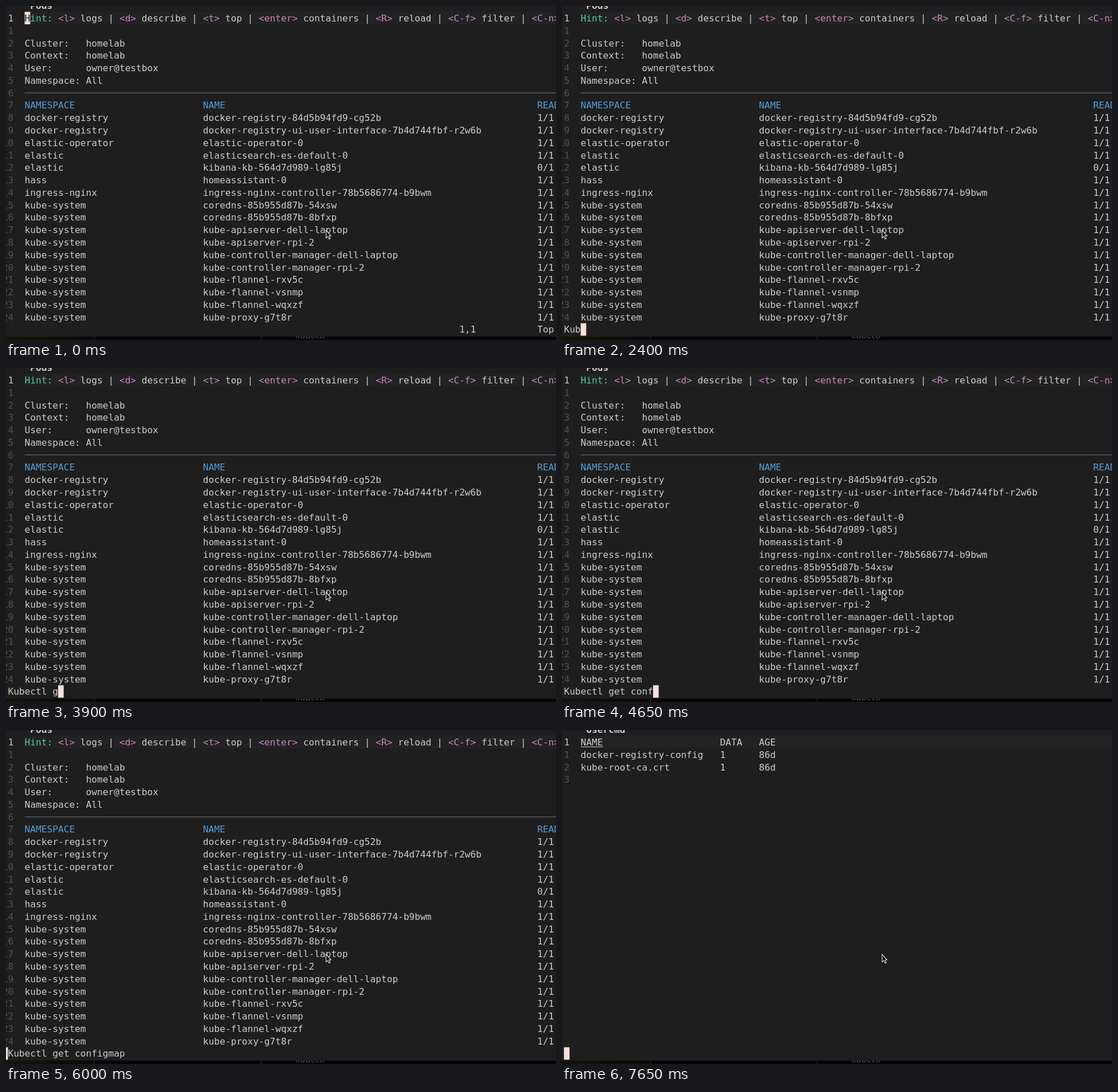
These frames come from a looping animation (960 px wide and 584 px high, 8 s). An HTML page with a canvas:

```html
<!DOCTYPE html>
<html lang="en">
<head>
<meta charset="utf-8">
<title>Cluster terminal</title>
<style>
  html, body { margin: 0; width: 100%; height: 100%; overflow: hidden; background: #1e1e1e; }
  canvas { display: block; }
</style>
</head>
<body>
<canvas id="stage" width="960" height="584"></canvas>
<script>
const ctx = document.getElementById('stage').getContext('2d');
const W = 960, H = 584, LOOP = 8000;
const LEFT = 3.4, TOP = 10.2, CELL_W = 9.725, ROW_H = 21.78;
const FONT = '16.2px "DejaVu Sans Mono", monospace';
const CMD_ROW = 25, TEXT_COL = 3;
const COLOR = {
  back: '#1e1e1e', line: '#222222', text: '#cccccc', dim: '#505050',
  teal: '#4ec9b0', pink: '#c586c0', blue: '#569cd6', cursor: '#f5e0dc'
};

const hints = [
  ['<l>', 'logs'], ['<d>', 'describe'], ['<t>', 'top'], ['<enter>', 'containers'],
  ['<R>', 'reload'], ['<C-f>', 'filter'], ['<C-n>', 'namespace']
];
const info = ['Cluster:   homelab', 'Context:   homelab', 'User:      owner@testbox', 'Namespace: All'];
const pods = [
  ['docker-registry', 'docker-registry-84d5b94fd9-cg52b'],
  ['docker-registry', 'docker-registry-ui-user-interface-7b4d744fbf-r2w6b'],
  ['elastic-operator', 'elastic-operator-0'],
  ['elastic', 'elasticsearch-es-default-0'],
  ['elastic', 'kibana-kb-564d7d989-lg85j', '0/1'],
  ['hass', 'homeassistant-0'],
  ['ingress-nginx', 'ingress-nginx-controller-78b5686774-b9bwm'],
  ...['coredns-85b955d87b-54xsw', 'coredns-85b955d87b-8bfxp',
    'kube-apiserver-dell-laptop', 'kube-apiserver-rpi-2',
    'kube-controller-manager-dell-laptop', 'kube-controller-manager-rpi-2',
    'kube-flannel-rxv5c', 'kube-flannel-vsnmp', 'kube-flannel-wqxzf',
    'kube-proxy-g7t8r'].map(name => ['kube-system', name])
];

// Typing: [time, number of characters entered]
const COMMAND = 'Kubectl get configmap';
const OPEN = 450, SENT = 6000, RESULT = 6150, REOPEN = 7650;
const keys = [
  [450, 0], [1200, 1], [1800, 0], [1950, 1], [2100, 2], [2400, 3], [2550, 4],
  [2850, 5], [3000, 7], [3900, 9], [4050, 10], [4200, 11], [4350, 13],
  [4500, 15], [4650, 16], [4800, 18], [4950, 19], [5100, 20], [5400, 21]
];

const colX = col => LEFT + col * CELL_W;
const rowY = row => TOP + row * ROW_H;

function put(str, col, row, color = COLOR.text, bold = false) {
  ctx.font = (bold ? 'bold ' : '') + FONT;
  ctx.fillStyle = color;
  [...str].forEach((ch, i) => {
    if (ch !== ' ') ctx.fillText(ch, colX(col + i), rowY(row) + 16.75);
  });
}

function block(col, row, ch = '') {
  ctx.fillStyle = COLOR.cursor;
  ctx.fillRect(colX(col), rowY(row), CELL_W, ROW_H);
  put(ch, col, row, COLOR.back);
}

function drawFrame(title, lastLine) {
  ctx.fillStyle = COLOR.back;
  ctx.fillRect(0, 0, W, H);
  ctx.fillStyle = COLOR.line;
  ctx.fillRect(colX(TEXT_COL), TOP, W, ROW_H);
  put(title, 4, -1, COLOR.text, true);
  put('1', 0, 0, '#c4c4c4');
  for (let n = 1; n <= lastLine; n++) {
    const label = String(n);
    put(label, 1 - label.length, n, COLOR.dim);
  }
}

function drawPods() {
  drawFrame('Pods', 24);
  put('Hint:', TEXT_COL, 0, COLOR.teal);
  let col = TEXT_COL + 6;
  hints.forEach(([key, label], i) => {
    if (i) {
      put('|', col, 0);
      col += 2;
    }
    put(key, col, 0, COLOR.pink);
    put(label, col + key.length + 1, 0);
    col += key.length + label.length + 2;
  });
  info.forEach((line, i) => put(line, TEXT_COL, 2 + i));
  ctx.fillStyle = '#6c6c6c';
  ctx.fillRect(colX(TEXT_COL), 151.3, W, 1.2);
  ['NAMESPACE', 'NAME', 'READY'].forEach((name, i) => put(name, [3, 35, 95][i], 7, COLOR.blue));
  pods.forEach(([space, name, ready = '1/1'], i) => {
    put(space, 3, 8 + i);
    put(name, 35, 8 + i);
    put(ready, 95, 8 + i);
  });
}

function drawResult() {
  drawFrame('Usercmd', 3);
  [['NAME', 'DATA', 'AGE'], ['docker-registry-config', '1', '86d'], ['kube-root-ca.crt', '1', '86d']]
    .forEach((cells, row) => cells.forEach((cell, i) => put(cell, [3, 28, 35][i], row)));
  ctx.fillStyle = COLOR.text;
  ctx.fillRect(colX(TEXT_COL), 29, 4 * CELL_W, 1);
}

function drawRuler(position) {
  put('1,1', 81, CMD_ROW);
  put(position, 95, CMD_ROW);
}

function drawDesktop() {
  const y = 578;
  ctx.save();
  ctx.beginPath();
  ctx.rect(0, y, W, H - y);
  ctx.clip();
  ctx.fillStyle = '#050505';
  ctx.fillRect(0, y, W, H - y);
  const glow = ctx.createLinearGradient(0, 0, 154, 0);
  glow.addColorStop(0, '#14150a');
  glow.addColorStop(1, '#080807');
  ctx.fillStyle = glow;
  ctx.fillRect(0, y, 154, H - y);
  ctx.fillStyle = '#2a2a2a';
  ctx.fillRect(154, y, 1, H - y);
  ctx.fillRect(445, y, 1, H - y);
  ctx.font = '15px "Noto Sans", sans-serif';
  ctx.fillStyle = '#555555';
  ctx.fillText('kubectl', 505, 581);
  ctx.restore();
}

function drawPointer() {
  ctx.save();
  ctx.translate(558.7, 392.3);
  ctx.beginPath();
  ctx.moveTo(0, 0);
  for (const [x, y] of [[0, 13.3], [3, 10.6], [5, 15.3], [7.2, 14.3], [5.2, 9.8], [8.6, 9.5]]) ctx.lineTo(x, y);
  ctx.closePath();
  ctx.fillStyle = '#111111';
  ctx.fill();
  ctx.strokeStyle = '#e8e8e8';
  ctx.lineWidth = 1.1;
  ctx.stroke();
  ctx.restore();
}

function drawCommand(t) {
  const typed = keys.filter(([at]) => at <= t).pop()[1];
  // The first key is typed in lower case, then corrected.
  put(t < 1800 ? 'k'.repeat(typed) : COMMAND.slice(0, typed), 0, CMD_ROW);
  block(t < SENT ? typed : -1, CMD_ROW);
}

function render(t) {
  if (t < RESULT) drawPods();
  else drawResult();

  if (t < OPEN) {
    block(TEXT_COL, 0, 'H');
    drawRuler('Top');
  } else if (t < RESULT) {
    drawCommand(t);
  } else if (t < REOPEN) {
    block(TEXT_COL, 0, 'N');
    put(COMMAND, 0, CMD_ROW);
    drawRuler('All');
  } else {
    block(0, CMD_ROW);
  }
  drawDesktop();
  drawPointer();
}

const start = performance.now();
function tick() {
  render((performance.now() - start) % LOOP);
  requestAnimationFrame(tick);
}
tick();
</script>
</body>
</html>
```
